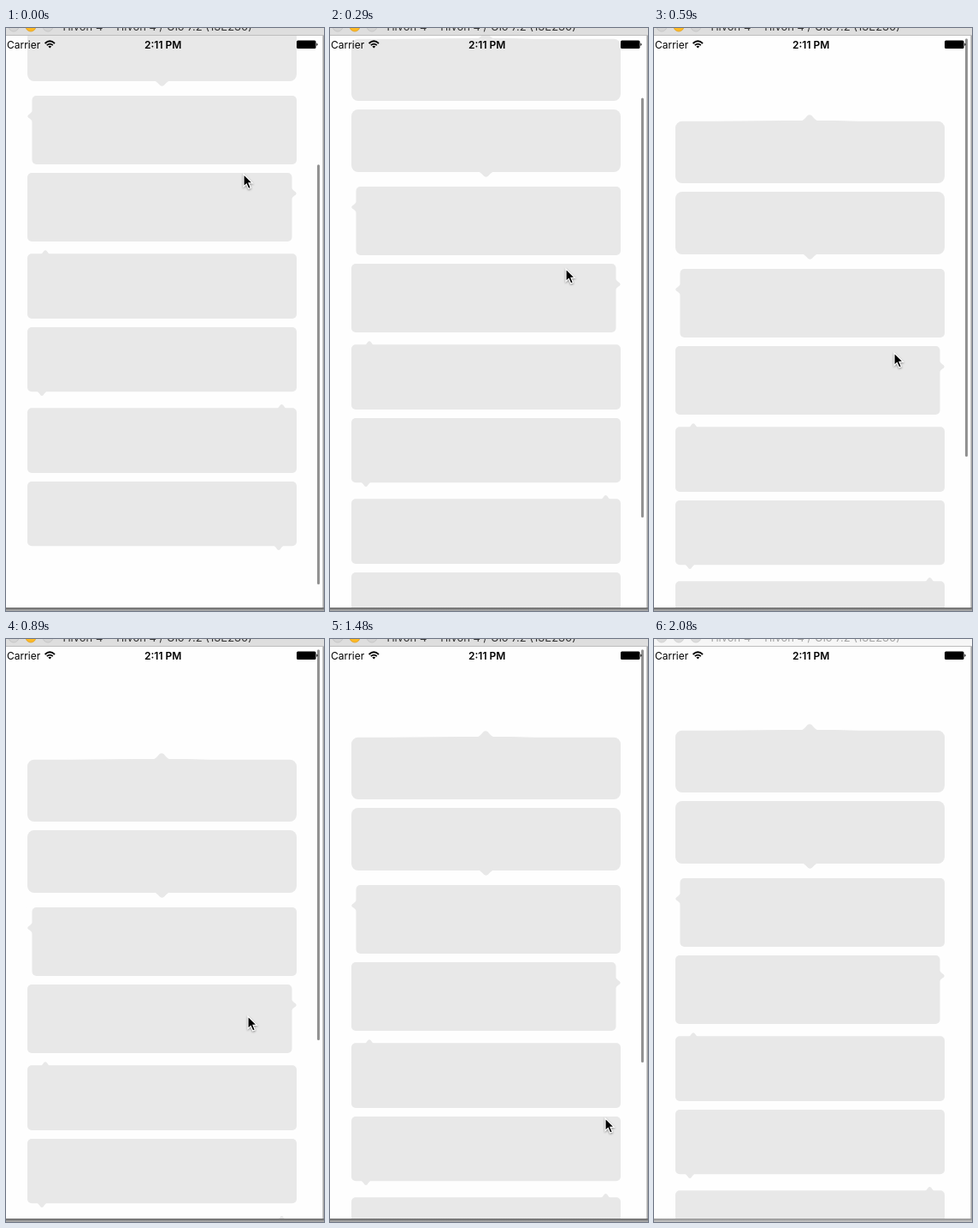
An HTML page for the animation above (2110 ms loop, 372 by 680 pixels).

```html
<!DOCTYPE html>
<html lang="en">
<head>
<meta charset="utf-8">
<title>Bubble list</title>
<style>
  html, body { margin: 0; width: 100%; height: 100%; overflow: hidden; background: #fefefe; }
  svg { display: block; width: 372px; height: 680px; font-family: Inter, Roboto, sans-serif; }
  #list { fill: #e8e8e8; }
  #title { fill: #333; }
  .idle #title { fill: #a4a4a4; }
  #chrome { fill: #dedede; }
  .idle #chrome { fill: #f6f6f6; }
  #lights circle { fill: #d5d5d5; stroke: #c2c2c2; stroke-width: .8; }
  #lights .amber { fill: #fdb924; stroke: #dfa023; }
  .idle #lights circle { fill: #dcdcdc; stroke: #cdcdcd; }
  .idle #foot { opacity: .7; }
</style>
</head>
<body>
<svg id="stage" viewBox="0 0 372 680">
  <defs>
    <clipPath id="screen"><rect y="9" width="371" height="667"/></clipPath>
    <linearGradient id="shade" x2="0" y2="1">
      <stop stop-color="#626262"/><stop offset="1" stop-color="#b4b4b4"/>
    </linearGradient>
  </defs>
  <rect width="372" height="680" fill="#fefefe"/>
  <g clip-path="url(#screen)"><g id="list"></g></g>
  <rect id="bar" x="364" width="3" rx="1.5" fill="#929292"/>

  <text x="1" y="24" font-size="12">Carrier</text>
  <g fill="none" stroke="#000" stroke-width="1.8">
    <path d="M45.6 18Q51.3 12.6 57 18M47.8 20.2Q51.3 17 54.8 20.2"/>
    <path d="M51.3 23.6L49.4 21.6Q51.3 20 53.2 21.6Z" fill="#000" stroke="none"/>
  </g>
  <text x="183.7" y="24" font-size="12" font-weight="600" text-anchor="middle">2:11 PM</text>
  <rect x="340" y="14.5" width="22.5" height="9.5" rx="1.5"/>
  <path d="M363.3 17.5Q366 19.2 363.3 21Z"/>

  <rect id="chrome" width="372" height="8"/>
  <rect y="8" width="372" height="1" fill="#bdbdbd"/>
  <g id="lights">
    <circle cx="9" cy="-2" r="6"/><circle class="amber" cx="29" cy="-2" r="6"/><circle cx="49" cy="-2" r="6"/>
  </g>
  <text id="title" x="64" y="3" font-size="13">Tilvon 4 - Tilvon 4 / Ulo 7.2 (13E230)</text>
  <rect x="370.4" y="9" width="1.6" height="667" fill="#a6a6a6"/>
  <rect id="foot" y="676" width="372" height="4" fill="url(#shade)"/>
  <path id="cursor" d="M0 0V14.5L3.3 11.4L5.7 17L8.4 15.9L6 10.4H10.4Z"
    stroke="#fff" stroke-width="1.2" style="filter:drop-shadow(0 1px 1px #0006)"/>
</svg>
<script>
const $ = id => document.getElementById(id);
const LOOP = 2110, REST = 106;

// Tail at (tx, ty), turned by an angle, beside a rounded body
function bubble(x, y, w, h, r, tx, ty, turn, scale = "1") {
  $("list").innerHTML += `<rect x="${x}" y="${y}" width="${w}" height="${h}" rx="${r}"/>
    <path d="M-7 6Q-5 6 -1.6 1Q0 -.6 1.6 1Q5 6 7 6Z"
      transform="translate(${tx} ${ty}) rotate(${turn}) scale(${scale})"/>`;
}
bubble(25, .7, 315, 72.3, 8, 182, -7, 0, "1.6 1.35");
$("list").innerHTML += '<path d="M68 1L152 .1H212L240 1Z"/>';
bubble(25, 83, 315, 73, 8, 182.5, 162, 180, "1.5 1.15");
bubble(30.5, 173, 309.5, 80, 5, 25, 197, -90);
bubble(25, 263, 309.5, 80, 5, 340, 287, 90);
bubble(25, 357.3, 315, 75.7, 5, 46, 353, 0);
bubble(25, 443, 315, 75.3, 5, 42, 523.3, 180);
bubble(25, 537.3, 315, 75.7, 5, 322.5, 532.8, 0);
bubble(25, 623, 315, 75.3, 5, 319, 703.3, 180);

// start time, list position, pointer x and y
const steps = [
  [0, -94, 278, 170.5], [140, -49, 277, 217], [290, 12, 276, 281],
  [440, 48, 278, 317], [590, 108, 281, 379], [740, 125, 282, 411],
  [890, 140, 283, 440], [1040, 153, 283, 464], [1190, 160, 283, 478],
  [1340, 136, 300, 513], [1480, 114, 322, 559], [1630, 108, 332, 606],
  [1780, REST, 342, 667]
];

function draw(now) {
  const t = now % LOOP;
  const [, top, px, py] = steps.findLast(s => s[0] <= t);
  $("list").setAttribute("transform", `translate(0 ${top})`);

  // The scroll indicator shortens while the list is pulled past its end
  const pull = Math.max(0, top - REST);
  $("bar").setAttribute("y", 12.3 + .735 * Math.max(0, REST - top));
  $("bar").setAttribute("height", 489.7 - pull);

  $("cursor").setAttribute("transform", `translate(${px} ${py})`);
  const gone = t >= 1930 ? "hidden" : "visible";
  $("bar").setAttribute("visibility", gone);
  $("cursor").setAttribute("visibility", gone);
  $("stage").classList.toggle("idle", t >= 2080);
}

const start = performance.now();
function tick() {
  draw(performance.now() - start);
  requestAnimationFrame(tick);
}
tick();
</script>
</body>
</html>
```
